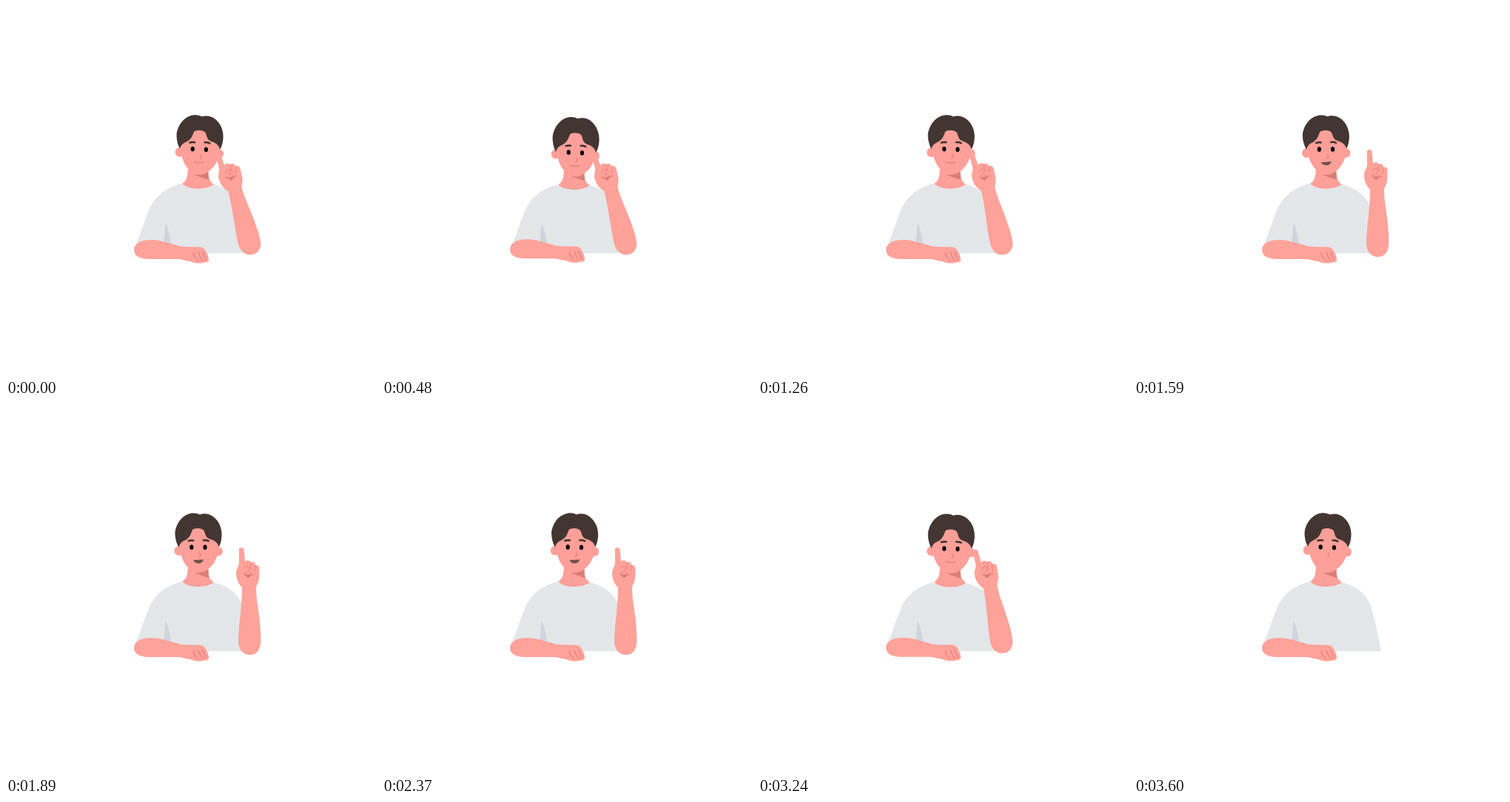
An HTML page for the animation above (3630 ms loop, 500 by 500 pixels).

```html
<!DOCTYPE html>
<html lang="en">
<head>
<meta charset="utf-8">
<title>Pointing gesture</title>
<style>
  html, body { margin: 0; width: 100%; height: 100%; overflow: hidden; background: #fff; }
  svg { display: block; width: 100vw; height: 100vh; }
  .skin { fill: #ffa29a; }
  .face { fill: #ff9f99; }
  .shade { fill: #d97f78; }
  .hair { fill: #433632; }
  .line { fill: none; stroke: #d9716e; stroke-width: 1; stroke-linecap: round; stroke-linejoin: round; }
  .crease { fill: none; stroke: #e67f78; stroke-width: .9; stroke-linecap: round; }
  .brow { fill: none; stroke: #3d302c; stroke-width: 2.5; stroke-linecap: round; }
</style>
</head>
<body>
<svg viewBox="0 0 500 500">
  <g id="torso">
    <path fill="#e3e7ea" d="M238 240C247 248 271 249 281 241C300 246 315 257 320 273C326 292 330 314 334 334H210L175 324C183 305 187 290 192 279C199 258 216 245 238 240Z"/>
    <path fill="#cfd5db" d="M216 293C220 303 222 312 223 322L213 320C215 310 214 302 216 293Z"/>
    <path class="face" d="M246 215C246 230 244 237 238 240C247 249 271 249 281 241C275 237 273 233 273 215Z"/>
    <path class="shade" d="M255 228Q265 228 273.3 223L274 235Q264 232 255 228Z"/>
  </g>
  <g id="restArm">
    <path class="skin" d="M173 330C173 320 184 316 196 316C208 316 222 321 237 325C250 326 258 325 265 326C270 328 274 338 274 343C274 347 269 346 266 347C260 348.500 253 347 249 345C244 345 238 342 233 342H193C180 342 173 337 173 330Z"/>
    <path class="line" d="M253 334Q255 341 259 344M260 333Q262 340 266 344M265 332Q268 337 270 343"/>
  </g>
  <g id="head">
    <g id="skull">
      <ellipse class="face" cx="234.600" cy="197.500" rx="6" ry="6.300"/>
      <ellipse class="face" cx="288" cy="200" rx="6" ry="6.300"/>
      <path class="face" d="M235 180C235 207 243 219 252 225C258 229 266 229 273 224C283 217 288 207 289 192L285 166H240Z"/>
    </g>
    <path id="hair" class="hair" d="M235 193C230.500 185 229.500 173 231.500 168C235 157 243 148.500 254 147.300C259 147 262 148 265 149.500C270 147.500 278 148.500 283.500 153.500C290 159 294 168 293.500 178C293 186 291 191 289 194C288 188.500 284 185.500 279 183.500C272 181.500 272 178 270 172C268 167 256 167 254 170C251 178 249 181 243 184C238 186 236 189 235 193Z"/>
    <g id="features">
      <ellipse cx="252.200" cy="193.200" rx="2.600" ry="3.300"/>
      <ellipse cx="270.400" cy="194" rx="2.600" ry="3.300"/>
      <path class="brow" d="M248.500 184.500Q251.500 183.500 255 184.200M268.500 184.300Q272 184 275.300 185.500"/>
      <path class="line" d="M262.800 201C264.500 203 264.300 206 261.800 206"/>
      <path id="smile" class="line" d="M254 210.800Q260 213.400 267 211.300"/>
      <path id="talk" fill="#70504b" d="M254 210.500Q261 211.200 267.600 210.300C266.500 217 256 217 254 210.500Z"/>
    </g>
  </g>
  <g id="arm">
    <path class="skin" d="M314.800 197C315 193 321 193 321.500 197L323 213C325 210 330 211 331 214C334 212 337 214 337 218C341 217 343 220 342.500 224L342 236C341 242 338 245 338 249C338 262 341 275 343 295C344 308 345 316 344 324C343 334 337 339 330 339C321 339 315 333 314 322C314 300 319 275 319 248C316 245 311 238 311 230C310.500 222 315 219 315 215Z"/>
    <path class="shade" d="M321 229.500Q328 231 334 230L327 235.500Z"/>
    <path class="crease" d="M322 222Q327 217 329 221Q329 228 320 229.500M331 214Q329.500 219 331 224M337 218Q335.500 222 336 227M329 227Q331 232 336 231"/>
  </g>
</svg>
<script>
const LOOP = 3630, STEP = 30, LEAN = -14.8;
const el = id => document.getElementById(id);
const [torso, restArm, head, skull, hair, features, smile, talk, arm] =
  ['torso', 'restArm', 'head', 'skull', 'hair', 'features', 'smile', 'talk', 'arm'].map(el);

// Each track holds [time, value] keys
const NOD = [[0, 0], [480, 1], [960, 0], [2730, 0], [3030, 1], [3420, 0], [3630, 0]];
const TILT = [[0, 0], [1080, 0], [1560, -2.6], [2190, -1.4], [2940, -1.4], [3600, 0], [3630, 0]];
const REACH = [[0, 1], [1190, 1], [1590, 0], [2940, 0], [3380, 1], [3630, 1]];

function at(track, t) {
  const i = track.findIndex(key => key[0] > t);
  const [t0, a] = track[i - 1], [t1, b] = track[i];
  const u = (t - t0) / (t1 - t0);
  return a + (b - a) * u * u * (3 - 2 * u);
}

const set = (node, transform) => node.setAttribute('transform', transform);
const show = (node, on) => node.setAttribute('visibility', on ? 'visible' : 'hidden');
const shift = (node, y) => set(node, `translate(0 ${y})`);
const stretch = (node, y, scale, dy = 0) =>
  set(node, `translate(0 ${y + dy}) scale(1 ${scale}) translate(0 ${-y})`);

function draw(t) {
  const nod = at(NOD, t), reach = at(REACH, t);
  const blank = t >= 3600, talking = t >= 1440 && t < 2850;

  stretch(torso, 334, 1 - 0.016 * nod);
  shift(restArm, -0.8 * nod);
  set(head, `rotate(${at(TILT, t)} 260 235)`);
  shift(skull, 2.6 * nod);
  stretch(hair, 148, 1 + 0.035 * nod, 2.8 * nod);
  shift(features, 4.6 * nod);
  set(arm, `translate(${0.3 * reach} ${-3 * reach}) rotate(${LEAN * reach} 330 324)`);

  show(arm, !blank);
  show(smile, !blank && !talking);
  show(talk, talking);
}

const start = performance.now();
function tick() {
  const t = (performance.now() - start) % LOOP;
  draw(Math.floor(t / STEP) * STEP);
  requestAnimationFrame(tick);
}
draw(0);
requestAnimationFrame(tick);
</script>
</body>
</html>
```
